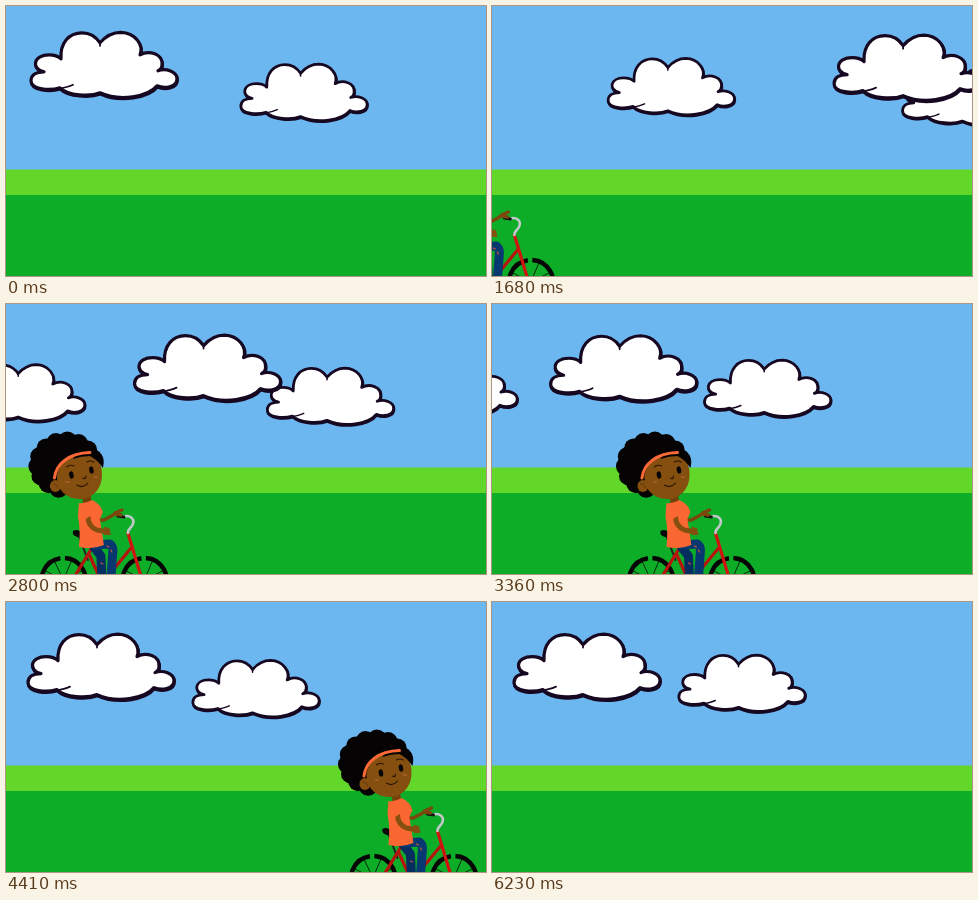
These frames come from a looping animation (480x270 px, 6.3 s). An HTML page:

```html
<!DOCTYPE html>
<html lang="en">
<head>
<meta charset="utf-8">
<title>Bike ride</title>
<style>
html, body { margin: 0; width: 100%; height: 100%; overflow: hidden; background: #6cb7f0; }
svg { display: block; width: 100vw; height: 100vh; }
.line { fill: none; stroke-linecap: round; stroke-linejoin: round; }
</style>
</head>
<body>
<svg viewBox="0 0 480 270" preserveAspectRatio="none">
  <defs>
    <path id="puff" d="M14 40C1 37 3 23 19 23C25 23 29 25 31 27C30 11 39 1 52 1C60 1 66 5 70 11C76 4 83 .5 91 .5C105 1 114 13 110 23C119 18 133 22 132 33C132 36 130 38 128 39C136 36 147 40 147 47C147 56 134 57 127 54C118 65 90 70 70 61C60 65 38 64 30 56C20 59 1 58 1 49C1 42 8 40 14 40Z"/>
    <g id="cloud" stroke="#170822" stroke-linejoin="round">
      <use href="#puff" x=".4" y="1.2" fill="#170822" stroke-width="3.200"/>
      <use href="#puff" fill="#fff" stroke-width="3.200"/>
      <path class="line" d="M28 57C35 56 39 55 43 53M70 11V14" stroke-width="1.800"/>
    </g>
    <g id="wheel" class="line" stroke="#050505">
      <path d="M1.500 -22A22 22 0 1 1 -3 -21.800" stroke-width="4.400" stroke-linecap="butt"/>
      <path d="M0 0L8 -19M0 0L-9 -19M0 0L18 -9M0 0L-18 -9" stroke-width=".8"/>
    </g>
  </defs>

  <rect width="480" height="164" fill="#6cb7f0"/>
  <rect y="163.500" width="480" height="26" fill="#62d729"/>
  <rect y="189" width="480" height="81" fill="#0dad28"/>

  <use id="smallA" href="#cloud"/>
  <use id="smallB" href="#cloud"/>
  <use id="bigA" href="#cloud"/>
  <use id="bigB" href="#cloud"/>

  <g id="rider">
    <use href="#wheel" x="274.500" y="276"/>
    <use href="#wheel" x="355.500" y="276"/>
    <g class="line">
      <path d="M290 232L299 256" stroke="#222" stroke-width="2"/>
      <path d="M303 244L286 272M343 243L319 272M300 250L310 272" stroke="#b8140f" stroke-width="3.200"/>
      <path d="M339 229L352 272" stroke="#d0140f" stroke-width="3.200"/>
      <path d="M334 213C341 210 346 215 344 220C343 224 339 224 339 229" stroke="#c2c8c9" stroke-width="2.600"/>
      <path d="M329 212L335 213" stroke="#111" stroke-width="3"/>
    </g>
    <path d="M284 227Q290 224 294 231L293 234Q286 233 284 230Z" fill="#080808"/>

    <g class="line">
      <path d="M306 216L315 216L328 209M326 209L333 206M327 210L332 211" stroke="#7b470e" stroke-width="3.500"/>
      <path d="M305 243L312 252L313 274" stroke="#052d60" stroke-width="9"/>
      <path d="M306 241L321 240Q324 242 324 247L322 274" stroke="#07386f" stroke-width="9"/>
      <path d="M318 242l2 1M322 246l1 2M312 259l2 1" stroke="#c9553b" stroke-width="1.200"/>
    </g>

    <path d="M293 188L301 188L303 199L294 200Z" fill="#74430c"/>
    <path d="M290 199Q297 200 303 196Q312 200 314 208L311 215L315 241Q303 246 290 243Q292 226 289 212Z" fill="#fb6732"/>
    <path class="line" d="M299 212C299 220 303 224 308 226L319 228" stroke="#85500f" stroke-width="5"/>
    <path class="line" d="M316 224L320 225M316 230L321 230" stroke="#85500f" stroke-width="2"/>
    <path d="M291 202Q298 200 303 211L295 216Q290 210 291 202Z" fill="#fb6732"/>

    <g id="hair" fill="#050303"><ellipse cx="277" cy="161" rx="29" ry="25"/></g>
    <path d="M268 174C268 160 283 149 299 149C309 151 314 161 313 173C312 187 302 195 291 195C277 195 269 186 268 174Z" fill="#85500f"/>
    <path d="M286 151Q305 145 313 151Q316 156 314 164Q309 156 301 152Q292 152 284 155Z" fill="#050303"/>
    <ellipse cx="266.500" cy="182" rx="5.500" ry="6" fill="#85500f"/>
    <path class="line" d="M264 180Q268 179 269 184" stroke="#65370a" stroke-width="1"/>
    <path class="line" d="M265.500 174C267 160 280 149 301 148.500" stroke="#fb6a36" stroke-width="3"/>
    <g fill="#090504">
      <ellipse cx="282.500" cy="171" rx="2.200" ry="3.700" transform="rotate(-12 282.500 171)"/>
      <ellipse cx="302.500" cy="166" rx="2.200" ry="3.700" transform="rotate(-12 302.500 166)"/>
    </g>
    <g class="line" stroke="#2c1405" stroke-width="1.100">
      <path d="M288 181Q294 185 299 179"/>
      <path d="M294 174Q297 176 297 172"/>
      <path d="M278 163Q281 160 285 162M298 158Q301 156 305 158"/>
    </g>
    <path class="line" d="M277 178h3M305 173h3" stroke="#a8602a" stroke-width="1.500"/>
  </g>
</svg>
<script>
const LOOP = 6300, STEP = 70;
const el = id => document.getElementById(id);

// curls run around the head from the nape to the brow
for (let i = 0; i < 11; i++) {
  const a = (105 + 24 * i) * Math.PI / 180;
  const x = 277 + 28 * Math.cos(a), y = 161 + 24 * Math.sin(a);
  el('hair').innerHTML += `<circle cx="${x}" cy="${y}" r="9.5"/>`;
}

const part = (t, start, length) => Math.min(1, Math.max(0, (t - start) / length));
const sine = s => (1 - Math.cos(Math.PI * s)) / 2;
const sway = (s, p = 1.79) => s ** p / (s ** p + (1 - s) ** p);

function place(id, x, y, scale = 1) {
  el(id).setAttribute('transform', `translate(${x.toFixed(2)} ${y.toFixed(2)}) scale(${scale})`);
}

function draw(t) {
  const g = sway(part(t, 0, 4200)), rest = 1 - g;
  const bob = 52.8 + 4.8 * g + 5 * Math.cos(2 * Math.PI * t / 2500);
  place('bigA', 24 - 545 * g, 25.800);
  place('bigB', 21 + 475 * rest, 27.2 + 4.4 * g);
  place('smallA', 234 - 364 * g, bob, .865);
  place('smallB', 186 + 332 * rest, bob + 15.2 * rest, .865);

  // a steady roll with one strong push across the middle
  const roll = .052 * t + 324 * sine(part(t, 2040, 3270));
  place('rider', roll - 404, 0);
}

function tick() {
  draw(Math.floor(performance.now() % LOOP / STEP) * STEP);
  requestAnimationFrame(tick);
}
tick();
</script>
</body>
</html>
```
